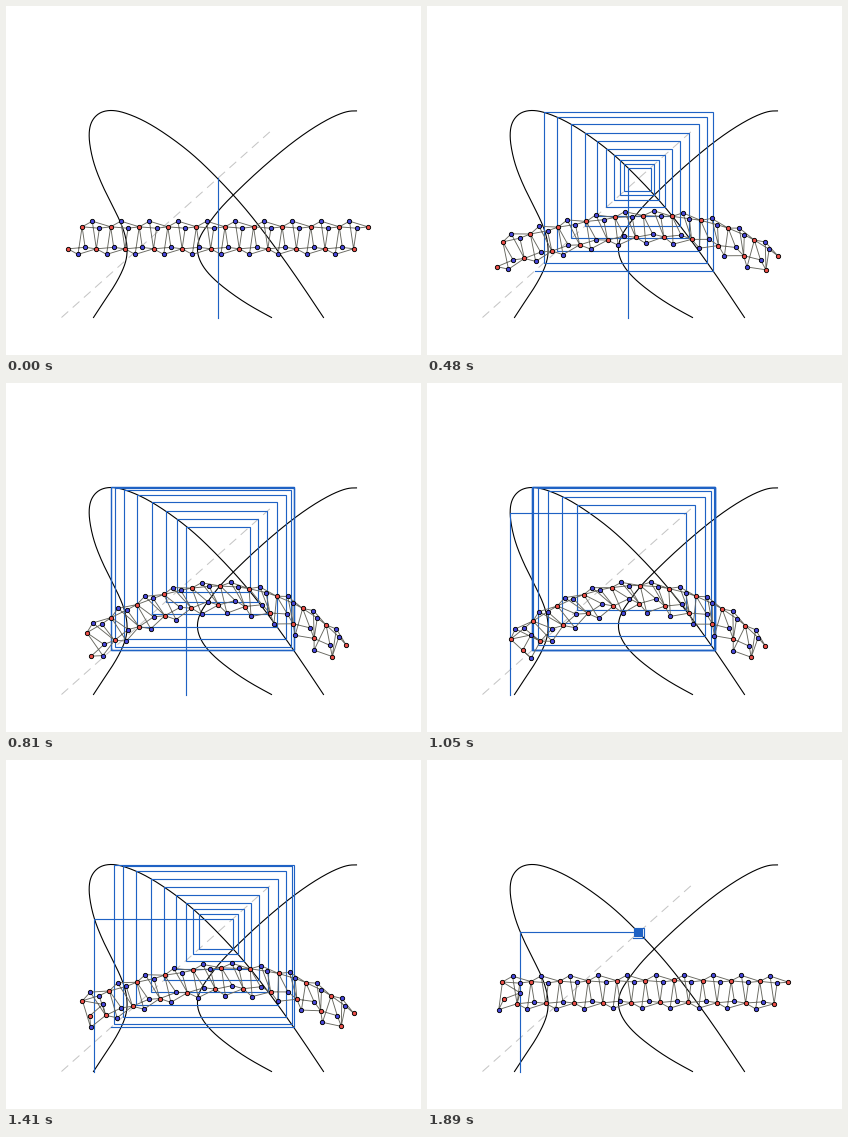
Write a matplotlib script that moves like this. It is 415 by 349 pixels and loops after 1.92 s.

```python
import numpy as np
import matplotlib.pyplot as plt
from matplotlib.animation import FuncAnimation

W, H, DPI = 415, 349, 100
FRAMES, INTERVAL = 64, 30
UNITS = 20            # linkage units, one map step each
FLOOR = 311           # bottom of the plot area
PX = 72 / DPI         # one pixel in points
BLUE, RED, NODE_BLUE = "#1f62c4", "#ee4f48", "#4747dc"

# Rest pose of one unit: three red joints and two blue ones
HALF, RISE = 14.29, 22
JOINTS = np.array([0, HALF - RISE * 1j, 2 * HALF])
LONG, SHORT = 10.2 + 5.6j, 17.35 - 1.45j
LEN_LONG, LEN_SHORT = abs(LONG - JOINTS), abs(SHORT - JOINTS)
D_REST = abs(JOINTS[1])
PLOT_SCALE = 13.0     # plot pixels per pixel of joint distance


def spline(points, n=5000):
    """Natural cubic spline through complex points."""
    p = np.array([complex(*q) for q in points])
    t = np.r_[0, np.cumsum(abs(np.diff(p)))]
    h = np.diff(t)
    m = np.eye(len(p))
    rhs = np.zeros(len(p), complex)
    for i in range(1, len(p) - 1):
        m[i, i - 1:i + 2] = h[i - 1], 2 * (h[i - 1] + h[i]), h[i]
        rhs[i] = 6 * ((p[i + 1] - p[i]) / h[i] - (p[i] - p[i - 1]) / h[i - 1])
    c = np.linalg.solve(m, rhs)
    s = np.linspace(0, t[-1], n)
    k = np.clip(np.searchsorted(t, s) - 1, 0, len(h) - 1)
    u, v, hk = s - t[k], t[k + 1] - s, h[k]
    return ((c[k] * v**3 + c[k + 1] * u**3) / (6 * hk)
            + (p[k] / hk - c[k] * hk / 6) * v
            + (p[k + 1] / hk - c[k + 1] * hk / 6) * u)


main = spline([
    (87, 311), (95.5, 298), (105.5, 283), (114.5, 267), (120, 251),
    (120, 236), (114, 216), (104, 195.5), (93, 172), (88, 158.5),
    (84, 142), (82.7, 127), (85.4, 115), (93, 106.8), (104, 104),
    (120, 107), (140, 115.8), (160, 128.2), (185, 147.2), (211, 171.9),
    (236, 199), (262, 231.8), (287, 266.5), (317, 311)])
other = spline([
    (350, 104.4), (344, 104.6), (334, 107.2), (318, 114.8), (300, 126),
    (280, 140.8), (262, 155.8), (245, 171), (228, 187.3), (213, 203),
    (201, 218.5), (193, 232), (191, 244), (194.5, 256), (204, 269),
    (220, 283), (241, 297.5), (265, 311)])

peak = int(np.argmin(main.imag))
branch = main[peak:]


def to_diag(y):
    return 55 + (FLOOR - y) * 211 / 188


# Fixed point of the map, and the path of the starting value back from it
fix = peak + int(np.argmin(abs(to_diag(branch.imag) - branch.real)))
g = to_diag(main.imag) - main.real
lo = fix - 1 if g[fix] < 0 else fix
w = g[lo] / (g[lo] - g[lo + 1])
FIX = main[lo] + w * (main[lo + 1] - main[lo])

left = np.flatnonzero((main.imag < FIX.imag) & (main.real < 100))[0]
path = np.r_[FIX, main[lo:left - 1:-1]]
arc = np.r_[0, np.cumsum(abs(np.diff(path)))]
PEAK_ARC = arc[np.argmin(path.imag)]


def start(n):
    """Arc length and point on the path: slow ends, very fast middle."""
    mid, width, end = 31, 0.4, 63.5
    a, b, c = np.arcsinh(np.array([n - mid, mid, end - mid]) / width)
    s = arc[-1] * (a + b) / (b + c)
    return s, complex(np.interp(s, arc, path.real), np.interp(s, arc, path.imag))


def orbit(p):
    """Cobweb polyline and the successive values of the map."""
    xs, line, y = [p.real], [(p.real, FLOOR)], p.imag
    for _ in range(UNITS):
        x = to_diag(y)
        line += [(xs[-1], y), (x, y)]
        xs.append(x)
        y = np.interp(x, branch.real, branch.imag)
    return np.array(xs), np.array(line)


def angle(d, near, far):
    """Angle between sides d and near, opposite to far."""
    return np.arccos(np.clip((d * d + near**2 - far**2) / (2 * d * near), -1, 1))


k = np.arange(UNITS + 2)
rest = HALF * (k - k.mean()) + 1j * np.where(k % 2, -RISE / 2, RISE / 2)


def chain(xs, past_peak, lean):
    d = D_REST + (xs - FIX.real) / PLOT_SCALE
    red = [0, d[0] * np.exp(1j * np.angle(JOINTS[1]))]
    blue = []
    for i in range(UNITS):
        prev, hub = red[-2:]
        sign = 1 if i % 2 else -1
        alpha = angle(d[i], LEN_SHORT[1], LEN_SHORT[0])
        beta = angle(d[i + 1], LEN_SHORT[1], LEN_SHORT[2])
        if i == 0 and past_peak:
            beta = -beta
        a0 = np.angle(prev - hub)
        a1 = a0 + sign * (alpha + beta)
        gap = angle(d[i + 1], LEN_LONG[1], LEN_LONG[2])
        red.append(hub + d[i + 1] * np.exp(1j * a1))
        blue += [hub + LEN_LONG[1] * np.exp(1j * (a1 - sign * gap)),
                 hub + LEN_SHORT[1] * np.exp(1j * (a0 + sign * alpha))]
    red, blue = np.array(red), np.array(blue)
    centre = np.r_[red, blue].mean()
    turn = np.vdot(red - red.mean(), rest)
    turn *= np.exp(1j * lean) / abs(turn)
    return [211 + 231.3j + (z - centre) * turn for z in (red, blue)]


def bars(red, blue):
    out = []
    for i in range(UNITS):
        a, b = blue[2 * i:2 * i + 2]
        r, s, t = red[i:i + 3]
        out += [a, r, b, s, a, t, b, complex(np.nan, np.nan)]
    return np.array(out)


fig = plt.figure(figsize=(W / DPI, H / DPI), dpi=DPI, facecolor="white")
ax = fig.add_axes([0, 0, 1, 1])
ax.set(xlim=(-0.5, W - 0.5), ylim=(H - 0.5, -0.5))
ax.axis("off")

ax.plot([55, 266], [311, 123], color="#c4c4c4", lw=PX, dashes=(9, 6), zorder=1)
for curve in (main, other):
    ax.plot(curve.real, curve.imag, color="black", lw=1.1 * PX, zorder=2)
web, = ax.plot([], [], color=BLUE, lw=1.15 * PX, solid_joinstyle="miter", zorder=3)
rods, = ax.plot([], [], color="#66665e", lw=0.9 * PX, zorder=4)


def dots(color):
    return ax.plot([], [], "o", ms=4.3 * PX, mfc=color, mec="black",
                   mew=0.9 * PX, zorder=5)[0]


blue_dots, red_dots = dots(NODE_BLUE), dots(RED)


def update(n):
    s, p = start(n)
    xs, line = orbit(p)
    lean = 0.009 * np.sqrt(np.sin(np.pi * n / 63.5))
    red, blue = chain(xs, s > PEAK_ARC, lean)
    web.set_data(line[:, 0], line[:, 1])
    for art, z in ((rods, bars(red, blue)), (blue_dots, blue), (red_dots, red)):
        art.set_data(z.real, z.imag)
    return web, rods, blue_dots, red_dots


anim = FuncAnimation(fig, update, frames=FRAMES, interval=INTERVAL,
                     repeat=True, repeat_delay=0, blit=False)
plt.show()
```
